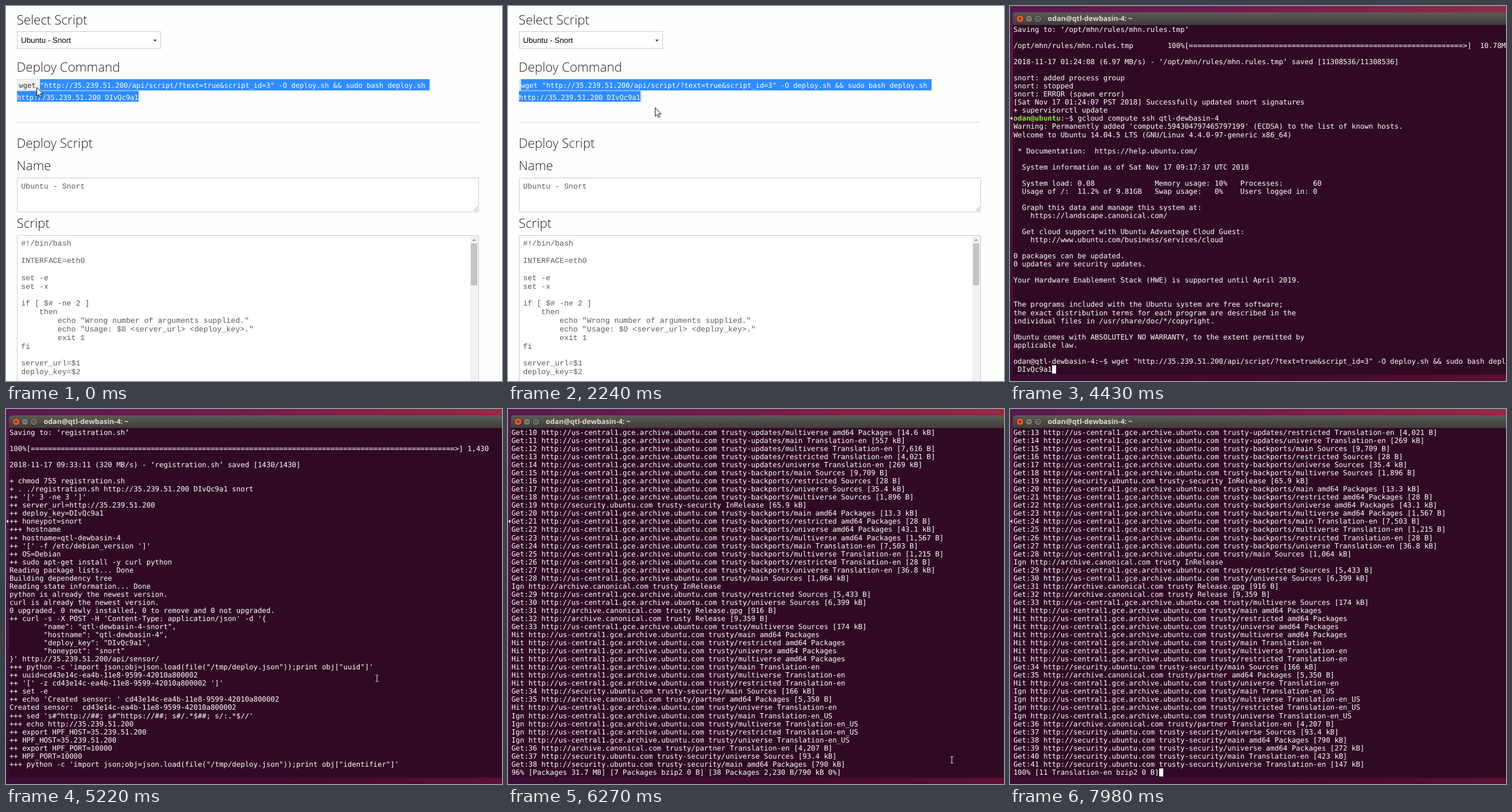
Recreate the animation shown at these times as an HTML page. Size 861 by 651 pixels, loop 8000 ms.

```html
<!DOCTYPE html>
<html lang="en">
<head>
<meta charset="utf-8">
<title>Deploying a sensor</title>
<style>
html, body { margin: 0; width: 100%; height: 100%; overflow: hidden; background: #fefefe; }
#stage { position: absolute; left: 0; top: 0; width: 861px; height: 651px; overflow: hidden; background: #fefefe; }
svg { position: absolute; left: 0; top: 0; color: #333; }
pre { position: absolute; margin: 0; white-space: pre; text-rendering: geometricPrecision; }
text { white-space: pre; text-rendering: geometricPrecision; }
.head { font: 300 22.3px "Open Sans", sans-serif; fill: #222; }
.code { font: 12.08px "DejaVu Sans Mono", monospace; fill: currentColor; }
.field { font: 13.2px/14.87px "Liberation Mono", monospace; color: #5c5c5c; fill: #5c5c5c; }
.box { fill: #fff; stroke: #ccc; }
#sel { color: #fff; }
#sel rect { fill: #2f8cff; }
#sel.blur { color: #323232; }
#sel.blur rect { fill: #c8c8c8; }
#script { left: 26.2px; top: 406.2px; }
#term { position: absolute; inset: 0; background: #300a24; overflow: hidden; }
#screen { left: 5.9px; top: 33.9px; font: 12.35px/14.05px "DejaVu Sans Mono", monospace; color: #fff; }
.user { color: #8ae234; font-weight: bold; }
.dir { color: #729fcf; font-weight: bold; }
.caret { background: #fff; }
.title { font: bold 12.4px "Open Sans", sans-serif; fill: #dfdbd2; }
</style>
</head>
<body>
<div id="stage">
  <svg width="861" height="651">
    <defs>
      <clipPath id="picked">
        <rect id="edge" x="59" y="127" width="861" height="19.5"/>
        <rect x="19" y="147.5" width="211" height="18.5"/>
      </clipPath>
      <g id="command">
        <text class="code" x="22.5" y="142">wget "http://35.239.51.200/api/script/?text=true&amp;script_id=3" -O deploy.sh &amp;&amp; sudo bash deploy.sh</text>
        <text class="code" x="19" y="162.5">http://35.239.51.200 DIvQc9a1</text>
      </g>
    </defs>
    <g class="head">
      <text x="18.5" y="31.5">Select Script</text>
      <text x="18.5" y="113.5">Deploy Command</text>
      <text x="18.5" y="245.5">Deploy Script</text>
      <text x="18.5" y="285">Name</text>
      <text x="18.5" y="384.5">Script</text>
    </g>
    <rect class="box" x="19.5" y="44.5" width="249" height="29"/>
    <text x="26" y="63.5" font-family="Liberation Sans, Arial, sans-serif" font-size="13.33">Ubuntu - Snort</text>
    <path d="M255.5 58.5h6l-3 3z" fill="#222"/>
    <path d="M735 127.5H19.5V146H735M19 148H232.5V166H19" fill="#f0f0f0" stroke="#ddd"/>
    <use href="#command"/>
    <g id="sel" clip-path="url(#picked)">
      <rect x="18" y="126" width="717.3" height="42"/>
      <use href="#command"/>
    </g>
    <path d="M19 202H820.5" stroke="#d0d0d0"/>
    <rect class="box" x="19.5" y="298.5" width="801" height="59"/>
    <text class="field" x="26.2" y="316.5">Ubuntu - Snort</text>
    <path d="M812 356l7-7M816 356l3-3" stroke="#888"/>
    <rect class="box" x="19.5" y="398.5" width="801" height="270"/>
    <path d="M806 399h14v252h-14z" fill="#f1f1f1"/>
    <path d="M807 412h11v73h-11z" fill="#c4c4c4"/>
    <path d="M809 408h7l-3.5-4z" fill="#a3a3a3"/>
  </svg>
  <pre id="script" class="field">#!/bin/bash

INTERFACE=eth0

set -e
set -x

if [ $# -ne 2 ]
    then
        echo "Wrong number of arguments supplied."
        echo "Usage: $0 &lt;server_url&gt; &lt;deploy_key&gt;."
        exit 1
fi

server_url=$1
deploy_key=$2</pre>

  <div id="term">
    <svg width="861" height="651">
      <defs>
        <linearGradient id="sky">
          <stop stop-color="#571a50"/><stop offset=".5" stop-color="#741c4b"/><stop offset="1" stop-color="#942a45"/>
        </linearGradient>
        <linearGradient id="ground">
          <stop stop-color="#3b0d33"/><stop offset=".6" stop-color="#430b2e"/><stop offset="1" stop-color="#5c1034"/>
        </linearGradient>
        <linearGradient id="side" x2="0" y2="1">
          <stop stop-color="#571a50"/><stop offset="1" stop-color="#3b0d33"/>
        </linearGradient>
        <linearGradient id="bar" x2="0" y2="1">
          <stop stop-color="#5d5b55"/><stop offset="1" stop-color="#3e3d39"/>
        </linearGradient>
      </defs>
      <path d="M0 0h861v20H0z" fill="url(#sky)"/>
      <path d="M0 12h5v632H0z" fill="url(#side)"/>
      <path d="M0 640h861v11H0z" fill="url(#ground)"/>
      <path d="M5 33V17q0-6 6-6h850v22z" fill="url(#bar)"/>
      <path d="M4 192v6l-4-3z" fill="#eee"/>
      <g stroke="#32312d">
        <circle cx="17.5" cy="22" r="6.3" fill="#ea5a2a"/>
        <circle cx="33" cy="22" r="6" fill="#7d7b73"/>
        <circle cx="48.5" cy="22" r="6" fill="#7d7b73"/>
        <path d="M15.3 19.8l4.4 4.4m0-4.4l-4.4 4.4M30 22h6M46.3 19.8h4.4v4.4h-4.4z" fill="none" stroke-width="1.2"/>
      </g>
      <text class="title" x="65.5" y="26.3">odan@qtl-dewbasin-4: ~</text>
    </svg>
    <pre id="screen"></pre>
  </div>

  <svg width="861" height="651">
    <path id="arrow" d="M.5.5V15.5L4 12.2 6.3 17.5 8.5 16.5 6.3 11.3H11z" fill="#fff" stroke="#111"/>
    <path id="beam" d="M-2.5-5.5h2L0-5l.5-.5h2M0-5V5M-2.5 5.5h2L0 5l.5.5h2" fill="none"/>
  </svg>
</div>
<script>
const $ = id => document.getElementById(id);
const LOOP = 8000, TERM_AT = 3570, ROWS = 42;
const HOST = 'qtl-dewbasin-4', IP = '35.239.51.200', KEY = 'DIvQc9a1';
const PROMPT = `odan@${HOST}:~$ `;
const UUID = 'cd43e14c-ea4b-11e8-9599-42010a800002', SECRET = '2Ado06lH4JwbxWeC';
const bar = n => '[' + '='.repeat(n) + '>]';
const readJson = key => `+++ python -c 'import json;obj=json.load(file("/tmp/deploy.json"));print obj["${key}"]'`;

const session = `Length: 11308536 (11M) [application/octet-stream]
Saving to: ‘/opt/mhn/rules/mhn.rules.tmp’

/opt/mhn/rules/mhn.rules.tmp        100%${bar(64)}  10.78M

2018-11-17 01:24:08 (6.97 MB/s) - ‘/opt/mhn/rules/mhn.rules.tmp’ saved [11308536/11308536]

snort: added process group
snort: stopped
snort: ERROR (spawn error)
[Sat Nov 17 01:24:07 PST 2018] Successfully updated snort signatures
+ supervisorctl update
odan@ubuntu:~$ gcloud compute ssh ${HOST}
Warning: Permanently added 'compute.594304797465797199' (ECDSA) to the list of known hosts.
Welcome to Ubuntu 14.04.5 LTS (GNU/Linux 4.4.0-97-generic x86_64)

 * Documentation:  https://help.ubuntu.com/

  System information as of Sat Nov 17 09:17:37 UTC 2018

  System load: 0.08              Memory usage: 10%   Processes:       60
  Usage of /:  11.2% of 9.81GB   Swap usage:   0%    Users logged in: 0

  Graph this data and manage this system at:
    https://landscape.canonical.com/

  Get cloud support with Ubuntu Advantage Cloud Guest:
    http://www.ubuntu.com/business/services/cloud

0 packages can be updated.
0 updates are security updates.

Your Hardware Enablement Stack (HWE) is supported until April 2019.


The programs included with the Ubuntu system are free software;
the exact distribution terms for each program are described in the
individual files in /usr/share/doc/*/copyright.

Ubuntu comes with ABSOLUTELY NO WARRANTY, to the extent permitted by
applicable law.

${PROMPT}wget "http://${IP}/api/script/?text=true&script_id=3" -O deploy.sh && sudo bash deploy.sh http://${IP}
 ${KEY}
--2018-11-17 09:33:08--  http://${IP}/api/script/?text=true&script_id=3
Connecting to ${IP}:80... connected.
HTTP request sent, awaiting response... 200 OK
Length: 3026 (3.0K) [text/html]
Saving to: ‘deploy.sh’

100%${bar(99)} 3,026

2018-11-17 09:33:08 (412 MB/s) - ‘deploy.sh’ saved [3026/3026]

+ '[' 2 -ne 2 ']'
+ server_url=http://${IP}
+ deploy_key=${KEY}
+ wget http://${IP}/static/registration.txt -O registration.sh
--2018-11-17 09:33:11--  http://${IP}/static/registration.txt
Connecting to ${IP}:80... connected.
HTTP request sent, awaiting response... 200 OK
Length: 1430 (1.4K) [text/plain]
Saving to: ‘registration.sh’

100%${bar(99)} 1,430

2018-11-17 09:33:11 (320 MB/s) - ‘registration.sh’ saved [1430/1430]

+ chmod 755 registration.sh
+ . ./registration.sh http://${IP} ${KEY} snort
++ '[' 3 -ne 3 ']'
++ server_url=http://${IP}
++ deploy_key=${KEY}
++ honeypot=snort
+++ hostname
++ hostname=${HOST}
++ '[' -f /etc/debian_version ']'
++ OS=Debian
++ sudo apt-get install -y curl python
Reading package lists... Done
Building dependency tree
Reading state information... Done
python is already the newest version.
curl is already the newest version.
0 upgraded, 0 newly installed, 0 to remove and 0 not upgraded.
++ curl -s -X POST -H 'Content-Type: application/json' -d '{
        "name": "${HOST}-snort",
        "hostname": "${HOST}",
        "deploy_key": "${KEY}",
        "honeypot": "snort"
}' http://${IP}/api/sensor/
${readJson('uuid')}
++ uuid=${UUID}
++ '[' -z ${UUID} ']'
++ set -e
++ echo 'Created sensor: ' ${UUID}
Created sensor:  ${UUID}
+++ sed 's#^http://##; s#^https://##; s#/.*$##; s/:.*$//'
+++ echo http://${IP}
++ export HPF_HOST=${IP}
++ HPF_HOST=${IP}
++ export HPF_PORT=10000
++ HPF_PORT=10000
${readJson('identifier')}
++ export HPF_IDENT=${UUID}
++ HPF_IDENT=${UUID}
${readJson('secret')}
++ export HPF_SECRET=${SECRET}
++ HPF_SECRET=${SECRET}
+ apt-get update`;

// Each line: verb letter, mirror letter, then what follows "trusty".
const apt = `Iu InRelease
Gu-updates InRelease [65.9 kB]
Gu-backports InRelease [65.9 kB]
Hu Release.gpg
Hu Release
Gu-updates/main Sources [425 kB]
Gu-updates/restricted Sources [6,322 B]
Gu-updates/universe Sources [223 kB]
Gu-updates/multiverse Sources [7,436 B]
Gu-updates/main amd64 Packages [1,123 kB]
Gu-updates/restricted amd64 Packages [17.2 kB]
Gu-updates/universe amd64 Packages [504 kB]
Gu-updates/multiverse amd64 Packages [14.6 kB]
Gu-updates/main Translation-en [557 kB]
Gu-updates/multiverse Translation-en [7,616 B]
Gu-updates/restricted Translation-en [4,021 B]
Gu-updates/universe Translation-en [269 kB]
Gu-backports/main Sources [9,709 B]
Gu-backports/restricted Sources [28 B]
Gu-backports/universe Sources [35.4 kB]
Gu-backports/multiverse Sources [1,896 B]
Gs-security InRelease [65.9 kB]
Gu-backports/main amd64 Packages [13.3 kB]
Gu-backports/restricted amd64 Packages [28 B]
Gu-backports/universe amd64 Packages [43.1 kB]
Gu-backports/multiverse amd64 Packages [1,567 B]
Gu-backports/main Translation-en [7,503 B]
Gu-backports/multiverse Translation-en [1,215 B]
Gu-backports/restricted Translation-en [28 B]
Gu-backports/universe Translation-en [36.8 kB]
Gu/main Sources [1,064 kB]
Ic InRelease
Gu/restricted Sources [5,433 B]
Gu/universe Sources [6,399 kB]
Gc Release.gpg [916 B]
Gc Release [9,359 B]
Gu/multiverse Sources [174 kB]
Hu/main amd64 Packages
Hu/restricted amd64 Packages
Hu/universe amd64 Packages
Hu/multiverse amd64 Packages
Hu/main Translation-en
Hu/multiverse Translation-en
Hu/restricted Translation-en
Gs-security/main Sources [166 kB]
Gc/partner amd64 Packages [5,350 B]
Hu/universe Translation-en
Iu/main Translation-en_US
Iu/multiverse Translation-en_US
Iu/restricted Translation-en_US
Iu/universe Translation-en_US
Gc/partner Translation-en [4,207 B]
Gs-security/universe Sources [93.4 kB]
Gs-security/main amd64 Packages [790 kB]
Gs-security/universe amd64 Packages [272 kB]
Gs-security/main Translation-en [423 kB]
Gs-security/universe Translation-en [147 kB]`;

const mirrors = { u: 'us-central1.gce.archive.ubuntu.com', s: 'security.ubuntu.com', c: 'archive.canonical.com' };
let fetched = 0;
const verbs = { I: () => 'Ign', H: () => 'Hit', G: () => `Get:${++fetched}` };
const log = session.split('\n').concat(apt.split('\n').map(
  s => `${verbs[s[0]]()} http://${mirrors[s[1]]} trusty${s.slice(2)}`));

// time, log lines printed so far, bottom row ("_" at the end is the block cursor)
const screens = [
  [3570, 42, PROMPT + '_'],
  [3850, 43, ` ${KEY}_`],
  [4580, 54, ''],
  [4700, 58, ''],
  [4970, 82, ''],
  [5100, 92, ''],
  [5220, 104, ''],
  [5350, 107, ''],
  [5470, 115, '0% [3 Sources 0 B/425 kB 0%]'],
  [5610, 145, '60% [3 Sources bzip2 0 B] [30 Sources 2,088 kB/6,399 kB 33%] [19 InRelease 24.2'],
  [5730, 148, '72% [3 Sources bzip2 0 B] [33 Sources 88.1 kB/174 kB 51%]'],
  [5850, 152, '81% [30 Sources bzip2 0 B] [34 Sources 24.2 kB/166 kB 15%]'],
  [6000, 156, '88% [30 Sources bzip2 0 B] [35 Packages 2,230 B/5,350 B 42%]'],
  [6120, 161, '93% [7 Packages bzip2 0 B] [37 Sources 2,230 B/93.4 kB 2%]'],
  [6270, 164, '96% [Packages 31.7 MB] [7 Packages bzip2 0 B] [38 Packages 2,230 B/790 kB 0%]'],
  [6400, 165, '97% [38 Packages bzip2 0 B] [40 Translation-en 2,230 B/423 kB 1%]'],
  [6520, 166, '98% [38 Packages bzip2 0 B] [41 Translation-en 24.2 kB/147 kB 16%]'],
  [6660, 167, '99% [38 Packages bzip2 0 B]'],
  [6780, 167, '100% [38 Packages bzip2 0 B]_'],
  [7230, 167, '100% [39 Packages 2,614 kB] [Translation-en 96 kB 23%]'],
  [7370, 167, '100% [39 Packages 2,698 kB] [Translation-en 98 kB 24%]'],
  [7690, 167, '100% [39 Packages 2,698 kB] [41 Translation-en bzip2 0 B]_'],
  [7980, 167, '100% [11 Translation-en bzip2 0 B]_']
];

// time, left end of the selection
const picks = [[0, 59], [130, 44.3], [280, 37], [400, 29.8], [520, 22.5]];

// time, x, y of the pointer
const arrows = [
  [0, 53, 141], [130, 39, 139], [280, 33, 138], [400, 27, 137], [520, 22, 137], [650, 19, 136],
  [790, 30, 135], [910, 70, 138], [1030, 110, 141], [1320, 360, 219], [1440, 538, 275],
  [1560, 111, 141], [2240, 255, 176], [2360]
];
const beams = [
  [0], [2360, 592, 348], [2510, 690, 506], [2660, 716, 497], [2780, 690, 530], [2900, 634, 561],
  [3570, 676, 579], [4000, 663, 465], [4430], [4970, 658, 466], [5220, 644, 467.5],
  [5350, 600, 474], [5470, 550, 482], [5610, 506.5, 490.5], [5730, 560, 515], [5850, 630, 545],
  [6000, 690, 575], [6120, 730, 595], [6270, 770.5, 609], [6400]
];

const at = (track, t) => track.reduce((hit, step) => step[0] <= t ? step : hit);
const escape = s => s.replace(/&/g, '&amp;').replace(/</g, '&lt;');

function place(node, [, x, y]) {
  node.style.display = x === undefined ? 'none' : '';
  if (x !== undefined) node.setAttribute('transform', `translate(${x} ${y})`);
}

let shown;
function print(screen) {
  if (screen === shown) return;
  shown = screen;
  const [, end, status] = screen;
  $('screen').innerHTML = escape([...log.slice(end - ROWS, end), status].join('\n'))
    .replace('odan@ubuntu:~', '<span class="user">odan@ubuntu</span>:<span class="dir">~</span>')
    .replace(/_$/, '<span class="caret"> </span>');
}

function draw(now) {
  const t = now % LOOP, inTerm = t >= TERM_AT;
  $('term').style.display = inTerm ? '' : 'none';
  if (inTerm) print(at(screens, t));
  $('edge').setAttribute('x', at(picks, t)[1]);
  $('sel').setAttribute('class', t >= 3430 ? 'blur' : '');
  place($('arrow'), at(arrows, t));
  place($('beam'), at(beams, t));
  $('beam').setAttribute('stroke', inTerm ? '#eee' : '#222');
}

const start = performance.now();
function tick() {
  draw(performance.now() - start);
  requestAnimationFrame(tick);
}
tick();
</script>
</body>
</html>
```
